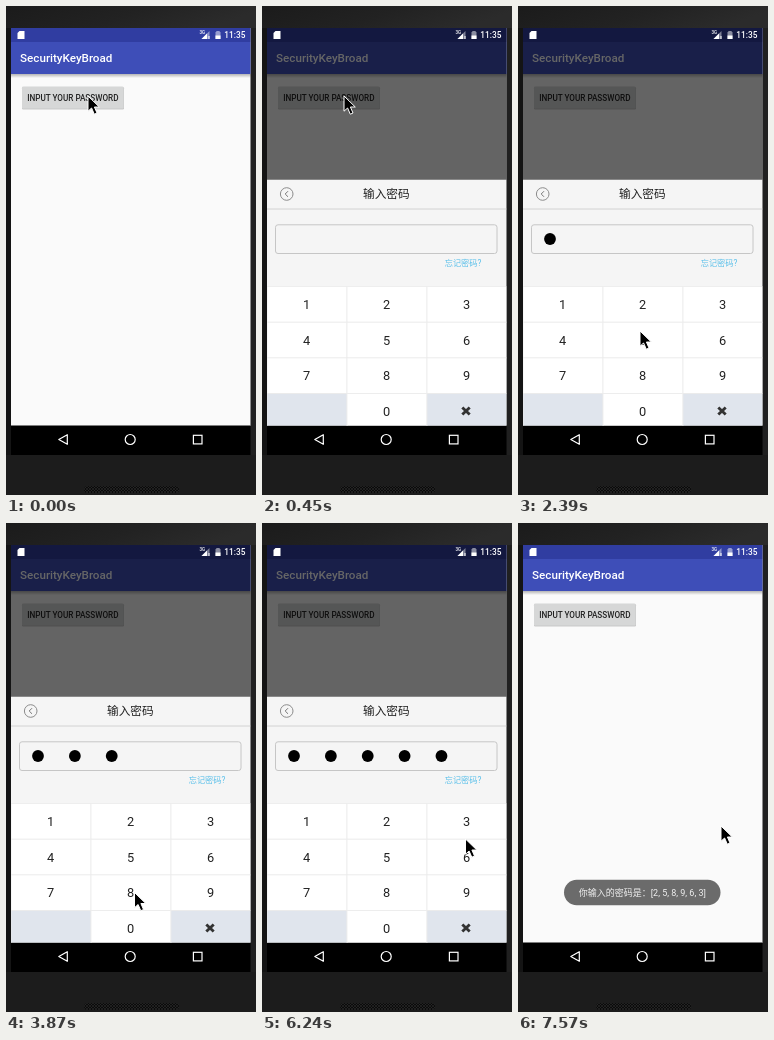
These frames come from a looping animation (250x489 px, 8000 ms). An HTML page:

```html
<!DOCTYPE html>
<html lang="en">
<head>
<meta charset="utf-8">
<title>Password keypad</title>
<style>
  html, body { margin: 0; width: 100%; height: 100%; overflow: hidden; background: #1c1c1c; }
  svg { display: block; width: 250px; height: 489px; }
  text { font-family: Roboto, "Noto Sans CJK SC", "Noto Sans CJK", sans-serif; }
  .mid { text-anchor: middle; }
  .medium { font-weight: 500; }
</style>
</head>
<body>
<svg viewBox="0 0 250 489" xmlns="http://www.w3.org/2000/svg">
  <defs>
    <linearGradient id="case" x1="0" y1="0" x2="1" y2="0.25">
      <stop offset="0" stop-color="#1b1b1b"/>
      <stop offset="0.55" stop-color="#222"/>
      <stop offset="1" stop-color="#2b2b2b"/>
    </linearGradient>
    <linearGradient id="shade" x1="0" y1="0" x2="0" y2="1">
      <stop offset="0" stop-color="#000" stop-opacity="0.28"/>
      <stop offset="1" stop-color="#000" stop-opacity="0"/>
    </linearGradient>
    <pattern id="mesh" width="3" height="3" patternUnits="userSpaceOnUse">
      <rect width="3" height="3" fill="#0b0b0b"/>
      <path d="M0 0L3 3M3 0L0 3" stroke="#2e2e2e" stroke-width="0.6"/>
    </pattern>
    <clipPath id="screen"><rect x="5" y="22" width="239.5" height="427"/></clipPath>
    <clipPath id="panel"><rect x="5" y="173.5" width="239.5" height="246"/></clipPath>
  </defs>

  <rect width="250" height="489" fill="#1c1c1c"/>
  <rect width="250" height="22" fill="url(#case)"/>
  <path d="M0 22H5V449H0Z" fill="#141414"/>
  <path d="M244.5 22H250V449H244.5Z" fill="#202020"/>
  <rect x="78" y="480" width="95" height="7" rx="3.5" fill="url(#mesh)"/>

  <g clip-path="url(#screen)">
    <rect x="5" y="22" width="240" height="398" fill="#fafafa"/>
    <rect x="5" y="68" width="240" height="4" fill="url(#shade)"/>
    <rect x="5" y="36" width="240" height="32" fill="#3e4eb8"/>
    <rect x="5" y="22" width="240" height="14" fill="#303da1"/>
    <text class="medium" x="14" y="56.3" font-size="11.67" fill="#fff">SecurityKeyBroad</text>
    <rect x="16" y="81" width="102" height="22.5" rx="1.2" fill="#000" opacity="0.2"/>
    <rect id="button" x="16" y="80.5" width="101.5" height="22" rx="1.2" fill="#d6d7d7"/>
    <text class="medium mid" x="66.8" y="94.6" font-size="8.17" fill="#212121">INPUT YOUR PASSWORD</text>
    <rect id="dim" x="5" y="22" width="240" height="398"/>

    <g fill="#fff">
      <path d="M13.5 25H18.5V33H11.5V27Z"/>
      <text class="medium" x="193.5" y="28" font-size="4.5">3G</text>
      <path d="M203.5 25V33H195.5Z" opacity="0.45"/>
      <path d="M201 27.5V33H195.5Z"/>
      <path d="M203 30V33" stroke="#fff"/>
      <path d="M210.3 25H213.7V26H214.5V33H209.5V26H210.3Z" opacity="0.5"/>
      <path d="M209.5 29.5H214.5V33H209.5Z"/>
      <text class="medium" x="218.3" y="32.2" font-size="8.3">11:35</text>
    </g>

    <rect x="5" y="419.5" width="240" height="30" fill="#000"/>
    <g id="sheet" clip-path="url(#panel)">
      <rect x="5" y="173.5" width="240" height="247" fill="#f5f5f5"/>
      <path d="M5 203H245" stroke="#d2d2d2"/>
      <circle cx="24.7" cy="188" r="6.3" fill="none" stroke="#8c8c8c"/>
      <path d="M26 185.2L23.2 188L26 190.8" fill="none" stroke="#777"/>
      <text class="mid" x="124.3" y="192.4" font-size="11.67" fill="#222">输入密码</text>
      <rect x="13.5" y="218.8" width="221.5" height="28.7" rx="2.5" fill="#f5f5f5" stroke="#c6c6c6"/>
      <text x="182.8" y="259.8" font-size="8.17" fill="#5cc0ea">忘记密码?</text>
      <g id="dots"></g>
      <g id="keys"></g>
      <path d="M200.3 401.5L207.7 408.5M207.7 401.5L200.3 408.5" stroke="#333" stroke-width="2.9"/>
    </g>

    <g fill="none" stroke="#fff" stroke-width="1.2">
      <path d="M61.3 428.7V438.3L52.8 433.5Z" stroke-linejoin="round"/>
      <circle cx="124.2" cy="433.5" r="5"/>
      <rect x="187.4" y="429.3" width="8.6" height="8.6"/>
    </g>

    <g id="toast">
      <rect x="46" y="356.7" width="156.5" height="25.6" rx="12.8" fill="#6b6b6b"/>
      <text class="mid" x="124.3" y="373" font-size="9" fill="#f2f2f2">你输入的密码是：[2, 5, 8, 9, 6, 3]</text>
    </g>
  </g>

  <path id="cursor" d="M0 0V15.2L3.6 12L6.3 18.2L9 17L6.4 11H11.3Z" fill="#000" stroke="#fff" stroke-width="1" stroke-linejoin="round"/>
</svg>

<script>
const LOOP = 8000;
const $ = id => document.getElementById(id);

function add(parent, tag, attrs, label) {
  const el = document.createElementNS("http://www.w3.org/2000/svg", tag);
  for (const k in attrs) el.setAttribute(k, attrs[k]);
  if (label) el.textContent = label;
  parent.appendChild(el);
  return el;
}

// Keypad: the two grey corner keys flank the zero.
["1", "2", "3", "4", "5", "6", "7", "8", "9", "", "0", ""].forEach((label, i) => {
  const x = 5 + (i % 3) * 80, y = 280.5 + Math.floor(i / 3) * 35.7;
  add($("keys"), "rect", { x, y, width: 80, height: 35.7,
    fill: label ? "#fff" : "#e0e5ed", stroke: "#ececec", "stroke-width": 0.8 });
  if (label) add($("keys"), "text", { class: "mid", x: x + 39.5, y: y + 22.5,
    "font-size": 12.8, fill: "#222" }, label);
});

const dots = Array.from({ length: 6 }, (_, i) =>
  add($("dots"), "circle", { cx: 32 + 36.87 * i, cy: 233, r: 5.9 }));
const dotTimes = [1940, 2980, 3870, 4910, 5790, 6980];

// time, tip x, tip y
const cursorSteps = [
  [0, 82, 90],
  [900, 68, 150], [1050, 59, 225], [1200, 90, 300], [1340, 124, 326], [1490, 120.5, 303],
  [2240, 121, 312], [2390, 122, 325], [2540, 123, 333], [2690, 124.5, 336],
  [3280, 127, 356], [3420, 128.5, 369.5],
  [4170, 140, 373], [4320, 165, 376], [4460, 186, 377], [4610, 194.5, 375],
  [5200, 198, 364], [5340, 201, 350], [5490, 202, 343],
  [6240, 203.5, 316], [6390, 203, 307], [6540, 203, 303]
];

// time, dim, sheet opacity, sheet offset, toast opacity, button fill
const viewSteps = [
  [0, 0, 0, 0, 0, "#d6d7d7"],
  [150, 0, 0, 0, 0, "#c6c7c7"],
  [300, 0.4, 0.8, 11, 0, "#c6c7c7"],
  [450, 0.6, 1, 0, 0, "#d6d7d7"],
  [7130, 0.2, 1, 3, 0, "#d6d7d7"],
  [7270, 0, 0, 3, 0, "#d6d7d7"],
  [7420, 0, 0, 3, 0.6, "#d6d7d7"],
  [7570, 0, 0, 3, 1, "#d6d7d7"]
];

const stepAt = (steps, t) => steps.filter(s => s[0] <= t).pop();

function draw(t) {
  const [, x, y] = stepAt(cursorSteps, t);
  const [, dim, alpha, drop, toast, fill] = stepAt(viewSteps, t);
  $("cursor").setAttribute("transform", `translate(${x} ${y})`);
  $("dim").setAttribute("opacity", dim);
  $("sheet").setAttribute("opacity", alpha);
  $("sheet").setAttribute("transform", `translate(0 ${drop})`);
  $("toast").setAttribute("opacity", toast);
  $("button").setAttribute("fill", fill);
  dots.forEach((dot, i) => dot.setAttribute("opacity", t >= dotTimes[i] ? 1 : 0));
}

const start = performance.now();
function tick() {
  draw((performance.now() - start) % LOOP);
  requestAnimationFrame(tick);
}
tick();
</script>
</body>
</html>
```
